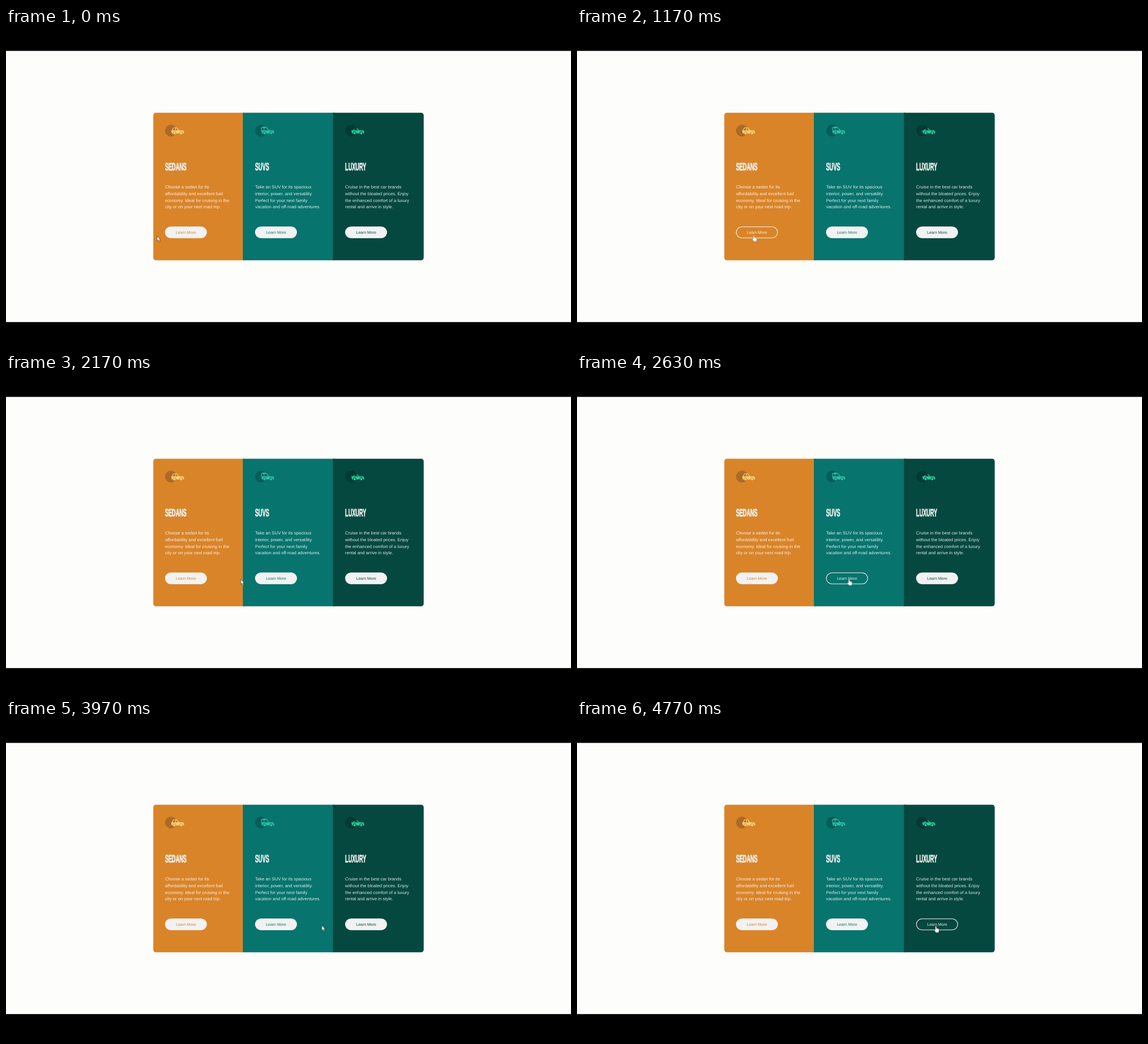
Write an HTML page that moves like this. It is 998 px wide and 561 px high and loops after 4.81 s.

```html
<!DOCTYPE html>
<html lang="en">
<head>
<meta charset="utf-8">
<title>Car cards</title>
<style>
  html, body { margin: 0; width: 100%; height: 100%; overflow: hidden; background: #000; }
  svg { display: block; width: 998px; height: 561px; }
  text { font-family: "Liberation Sans", Arial, sans-serif; text-rendering: geometricPrecision; }
  .title { font-size: 18.6px; font-weight: 700; fill: #f2f2f2; stroke: #f2f2f2; stroke-width: .8px; }
  .copy { font-size: 7.78px; fill: #fff; fill-opacity: .86; }
  .label { font-size: 6.98px; text-anchor: middle; }
  .cabin { fill: none; stroke-width: 1.2px; }
</style>
</head>
<body>
<svg id="stage" viewBox="0 0 998 561">
  <defs><clipPath id="card"><rect x="260.2" y="149.5" width="477.6" height="260.2" rx="4.5"/></clipPath></defs>
  <rect y="40.4" width="998" height="478.4" fill="#fdfdfc"/>
  <g id="columns" clip-path="url(#card)"></g>
  <g id="cursor">
    <path id="arrow" d="M0 0V9L2 7.4L3.5 10.8L5 10L3.5 6.8H6Z" fill="#fff" stroke="#222" stroke-width=".6"/>
    <path id="hand" d="M-1 1Q0-1 1 1V4L5 5Q6 8 4.6 11.6H0L-3 7Q-3 5-1 7Z" fill="#fff" stroke="#333" stroke-width=".4"/>
  </g>
</svg>
<script>
const LOOP = 4810;
const FADE = 300;
const NS = "http://www.w3.org/2000/svg";
const PAPER = "#f2f2f2";
const HULL = "M10.8 9.8H31Q34 10.4 33.6 15.4H12Z";

// hover: times when the pointer enters and leaves the button
const cars = [
  {
    title: "SEDANS", color: "#d98429", disc: "#ab6a28", paint: "#fbd177",
    copy: ["Choose a sedan for its", "affordability and excellent fuel",
           "economy. Ideal for cruising in the", "city or on your next road trip."],
    cabin: "M12.5 10L15 5.4H20.6L24.6 10M18.4 5V10",
    hover: [130, 1455]
  },
  {
    title: "SUVS", color: "#07746d", disc: "#065d59", paint: "#2fbba7",
    copy: ["Take an SUV for its spacious", "interior, power, and versatility.",
           "Perfect for your next family", "vacation and off-road adventures."],
    cabin: "M11.2 10V5.2H20.8L24.6 10M15.8 5V10M13 4H19",
    hover: [2300, 3605]
  },
  {
    title: "LUXURY", color: "#05483f", disc: "#033a35", paint: "#2cc596",
    copy: ["Cruise in the best car brands", "without the bloated prices. Enjoy",
           "the enhanced comfort of a luxury", "rental and arrive in style."],
    cabin: "M14 10L17 8M20.4 6.4L24.4 10",
    hover: [4355]
  }
];

// Stops of the pointer tip: time, x, y, easing to the next stop
const route = [
  [0, 267, 367],
  [100, 267, 367, "ease-out"],
  [430, 309, 365.5],
  [1070, 309, 365.5, "ease-in-out"],
  [1800, 397, 362],
  [2100, 397, 362, "ease-out"],
  [2630, 480.5, 361.5],
  [3300, 480.5, 361.5],
  [3600, 518, 360],
  [4430, 607, 365],
  [4770, 634, 363.5],
  [LOOP, 634, 363.5]
];

function add(parent, tag, attrs, text) {
  const el = document.createElementNS(NS, tag);
  for (const key in attrs) el.setAttribute(key, attrs[key]);
  if (text) el.textContent = text;
  parent.append(el);
  return el;
}

// steps: [time, style, easing to the next step]
function loop(el, steps) {
  const frames = steps.map(([t, style, easing = "linear"]) => ({ ...style, easing, offset: t / LOOP }));
  el.animate(frames, { duration: LOOP, iterations: Infinity });
}

// Fade between the idle (0) and hovered (1) look at each change.
function fades(hover, look) {
  const changes = hover.flatMap((t, i) => [[t, look(i % 2), "ease"], [t + FADE, look(1 - i % 2)]]);
  return [[0, look(0)], ...changes, [LOOP, look(hover.length % 2)]];
}

function drawIcon(col, { color, disc, paint, cabin }) {
  const icon = add(col, "g", { transform: "translate(20.6 20.9)" });
  add(icon, "circle", { cx: 10.4, cy: 10.4, r: 10.4, fill: disc });
  add(icon, "path", { d: cabin, stroke: paint, class: "cabin" });
  add(icon, "path", { d: HULL, fill: paint });
  for (const cx of [16.6, 28.4]) {
    add(icon, "circle", { cx, cy: 14.8, r: 2.6, fill: paint, stroke: color });
  }
}

function drawButton(col, { color, hover }) {
  const box = add(col, "rect", {
    x: 21, y: 201, width: 73, height: 19.6, rx: 9.8,
    fill: PAPER, stroke: PAPER, "stroke-width": 1.1
  });
  const label = add(col, "text", { x: 57.6, y: 213.3, class: "label", fill: color }, "Learn More");
  loop(box, fades(hover, on => ({ fillOpacity: 1 - on })));
  loop(label, fades(hover, on => ({ fill: on ? PAPER : color })));
}

const columns = document.getElementById("columns");
cars.forEach((car, i) => {
  const col = add(columns, "g", { transform: `translate(${260.3 + i * 159.1} 149.7)` });
  add(col, "rect", { x: -1, y: -1, width: 162, height: 262, fill: car.color });
  drawIcon(col, car);
  add(col, "text", { transform: "translate(20.6 101.5) scale(.49 1)", class: "title" }, car.title);
  car.copy.forEach((line, n) =>
    add(col, "text", { x: 20.6, y: 133.6 + n * 11.66, class: "copy" }, line));
  drawButton(col, car);
});

loop(document.getElementById("cursor"),
  route.map(([t, x, y, easing]) => [t, { transform: `translate(${x}px, ${y}px)` }, easing]));

// The pointer is a hand whenever a button is hovered.
const swaps = [0, ...cars.flatMap(car => car.hover), LOOP];
["arrow", "hand"].forEach((id, kind) => {
  const shown = i => ({ opacity: +(i % 2 === kind) });
  const last = swaps.length - 2;
  loop(document.getElementById(id), swaps.map((t, i) => [t, shown(Math.min(i, last)), "step-end"]));
});
</script>
</body>
</html>
```
